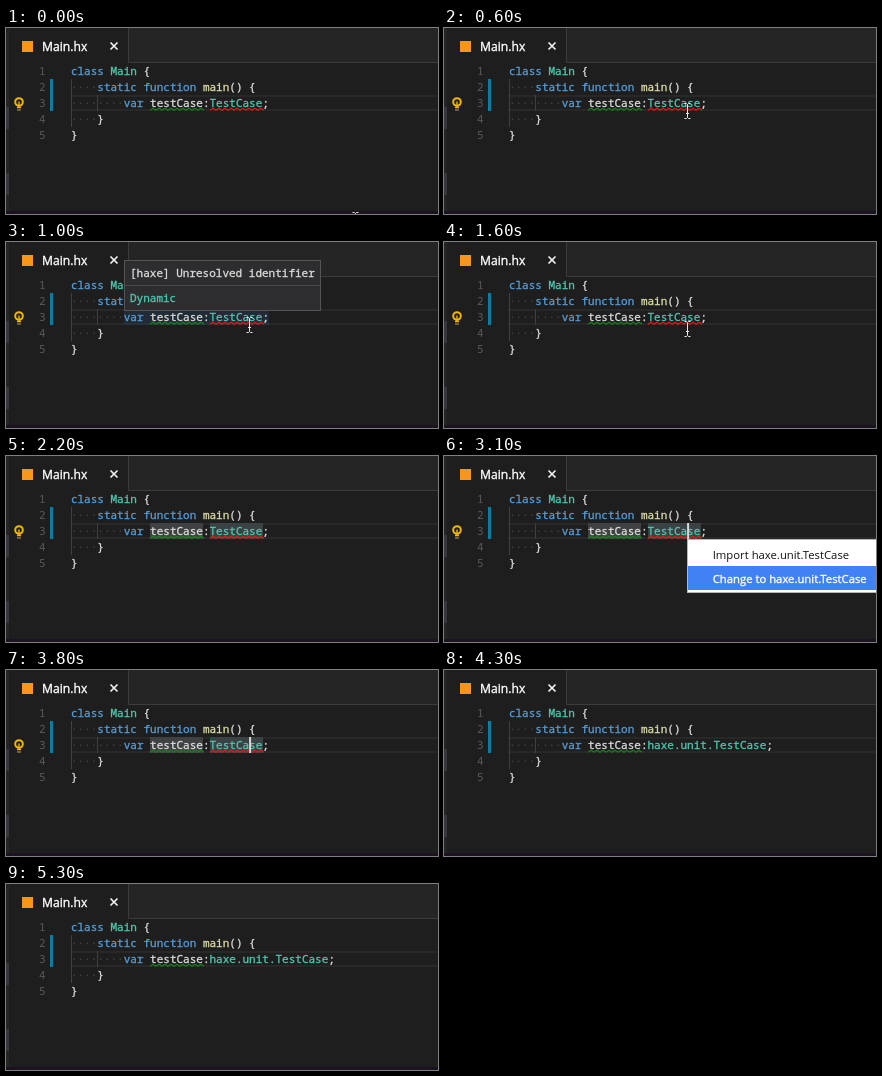
An HTML page for the animation above (5.6 s loop, 432 by 186 pixels).

```html
<!DOCTYPE html>
<html lang="en">
<head>
<meta charset="utf-8">
<title>Quick fix in the editor</title>
<style>
  html, body { margin: 0; width: 100%; height: 100%; overflow: hidden; background: #1e1e1e; }
  svg { display: block; width: 432px; height: 186px; }
  text { white-space: pre; }
  text, tspan { fill: currentColor; stroke: currentColor; stroke-width: 0; }
  .code { font: 11px "Noto Sans Mono", "DejaVu Sans Mono", monospace; color: #dcdcdc; }
  .code text, .code tspan { stroke-width: .3px; }
  .ui { font: 11.3px "Open Sans", "Noto Sans", sans-serif; color: #111; }
  .ui .on, .tab { color: #fff; stroke-width: .35px; }
  .tab { font-size: 12.15px; }
  .code .num { color: #5a5a5a; text-anchor: end; stroke-width: 0; }
  .code .dots { color: #4a4a4a; stroke-width: 0; }
  .kw { color: #569cd6; }
  .type { color: #4ec9b0; }
  .fn { color: #dcdcaa; }
  .box { fill: #2d2d30; stroke: #555; }
  .wave { fill: none; stroke-width: 1.1; }
</style>
</head>
<body>
<svg viewBox="0 0 432 186">
  <rect width="432" height="186" fill="#1e1e1e"/>

  <!-- tab bar and window edges -->
  <rect x="122" width="310" height="35" fill="#252526"/>
  <path d="M122.5 0V34.5H432" fill="none" stroke="#3c3c3c"/>
  <rect width="3" height="186" fill="#252526"/>
  <path d="M0 79h3v22h-3zM0 145h3v22h-3z" fill="#37373d"/>
  <rect y="183" width="432" height="3" fill="#1b1420"/>
  <rect x="16" y="13" width="11" height="11" fill="#f8961c"/>
  <text class="ui tab" x="36" y="23">Main.hx</text>
  <path d="M104.5 14.5l7 7m0-7l-7 7" stroke="#eee" stroke-width="1.7"/>

  <!-- current line, guides and changed-line mark -->
  <path d="M64 68H432M64 82H432" stroke="#282828" stroke-width="2"/>
  <path d="M65.5 51V99M91.5 67V83" stroke="#404040"/>
  <rect x="44" y="51" width="3" height="32" fill="#0c7d9d"/>

  <rect id="range" x="118" y="67" width="145" height="16" fill="#264f78" opacity=".25"/>
  <g id="words">
    <rect x="144" y="67" width="53" height="16" fill="#3f4143"/>
    <rect x="204" y="67" width="53" height="16" fill="#3a4244"/>
  </g>

  <g id="numbers" class="code"></g>
  <g class="code">
    <text x="64.9" y="47"><tspan class="kw">class</tspan> <tspan class="type">Main</tspan> {</text>
    <text x="64.9" y="63"><tspan class="dots">····</tspan><tspan class="kw">static function</tspan> <tspan class="fn">main</tspan>() {</text>
    <text x="64.9" y="79"><tspan class="dots">········</tspan><tspan class="kw">var</tspan> testCase:<tspan id="type" class="type">TestCase</tspan>;</text>
    <text x="64.9" y="95"><tspan class="dots">····</tspan>}</text>
    <text x="64.9" y="111">}</text>
  </g>
  <path id="hint" class="wave" stroke="#15831a"/>
  <path id="error" class="wave" stroke="#f01414"/>
  <rect id="caret" y="67" width="2" height="16" fill="#d8d8d8"/>

  <g id="bulb" fill="none">
    <circle cx="13" cy="74" r="3.8" stroke="#f0b800" stroke-width="2"/>
    <path d="M13 73.5v5.5M11 79.5h4" stroke="#f0b800" stroke-width="1.4"/>
    <path d="M11 82h4" stroke="#b8a060"/>
  </g>

  <g id="brief" class="code">
    <rect class="box" x="197.5" y="43.5" width="196" height="25"/>
    <text x="203.2" y="60">[haxe] Unresolved identifier</text>
  </g>
  <g id="full" class="code">
    <rect class="box" x="118.5" y="18.5" width="196" height="50"/>
    <path d="M119 43.5h195" stroke="#4a4a4c"/>
    <text x="124" y="35">[haxe] Unresolved identifier</text>
    <text class="type" x="124" y="60">Dynamic</text>
  </g>

  <g id="menu" class="ui">
    <rect x="243.5" y="83.5" width="190" height="53" fill="#fff" stroke="#b4b4b4"/>
    <rect id="pick" x="244" width="188" height="24" fill="#4281f4"/>
    <text id="item0" x="268.7" y="103">Import haxe.unit.TestCase</text>
    <text id="item1" x="268.7" y="127">Change to haxe.unit.TestCase</text>
  </g>

  <path id="beam" d="M-3 -7.5h2l1 1 1-1h2M0 -6.5v13M-3 7.5h2l1-1 1 1h2M-1.5 2.5h3"
    fill="none" stroke="#e8e8e8"/>
</svg>
<script>
const LOOP = 5600, STEP = 100;
const FIXED = 3900; // the type name is replaced here
const $ = id => document.getElementById(id);

// spans of time in which each part is visible
const shown = {
  beam: [[0, 1800]],
  brief: [[900, 1000]],
  full: [[1000, 1600]],
  range: [[900, 1600]],
  bulb: [[0, 1700], [1800, FIXED]],
  words: [[2000, FIXED]],
  error: [[0, FIXED]],
  caret: [[1700, 2200], [2700, 3200], [3700, 4300], [4900, 5300]],
  menu: [[2300, 3800]],
  pick: [[2800, 3800]]
};

function wave(x, width) {
  let d = `M${x} 82.3`;
  for (let i = 1; i <= width / 3; i++) d += `L${x + i * 3} ${i % 2 ? 80.2 : 82.3}`;
  return d;
}

function beamAt(t) {
  const p = Math.min(t / 600, 1);
  const e = p * p * (3 - 2 * p);
  return [349.5 - 106 * e, (t < 1600 ? 192 : 196) - 109 * e];
}

function draw(time) {
  const t = Math.floor(time % LOOP / STEP) * STEP;
  for (const id in shown) {
    const on = shown[id].some(([from, to]) => t >= from && t < to);
    $(id).style.display = on ? '' : 'none';
  }
  const fixed = t >= FIXED;
  $('type').textContent = fixed ? 'haxe.unit.TestCase' : 'TestCase';
  $('caret').setAttribute('x', fixed ? 322.3 : 243.1);
  $('beam').setAttribute('transform', `translate(${beamAt(t)})`);

  const choice = t < 2800 ? -1 : t < 3100 ? 0 : 1;
  $('pick').setAttribute('y', choice === 1 ? 110 : 86);
  for (const i of [0, 1]) $('item' + i).classList.toggle('on', i === choice);
}

for (let n = 1; n <= 5; n++) {
  $('numbers').innerHTML += `<text class="num" x="39.5" y="${31 + n * 16}">${n}</text>`;
}
$('hint').setAttribute('d', wave(144, 54));
$('error').setAttribute('d', wave(204, 54));

const start = performance.now();
function tick() {
  draw(performance.now() - start);
  requestAnimationFrame(tick);
}
tick();
</script>
</body>
</html>
```
